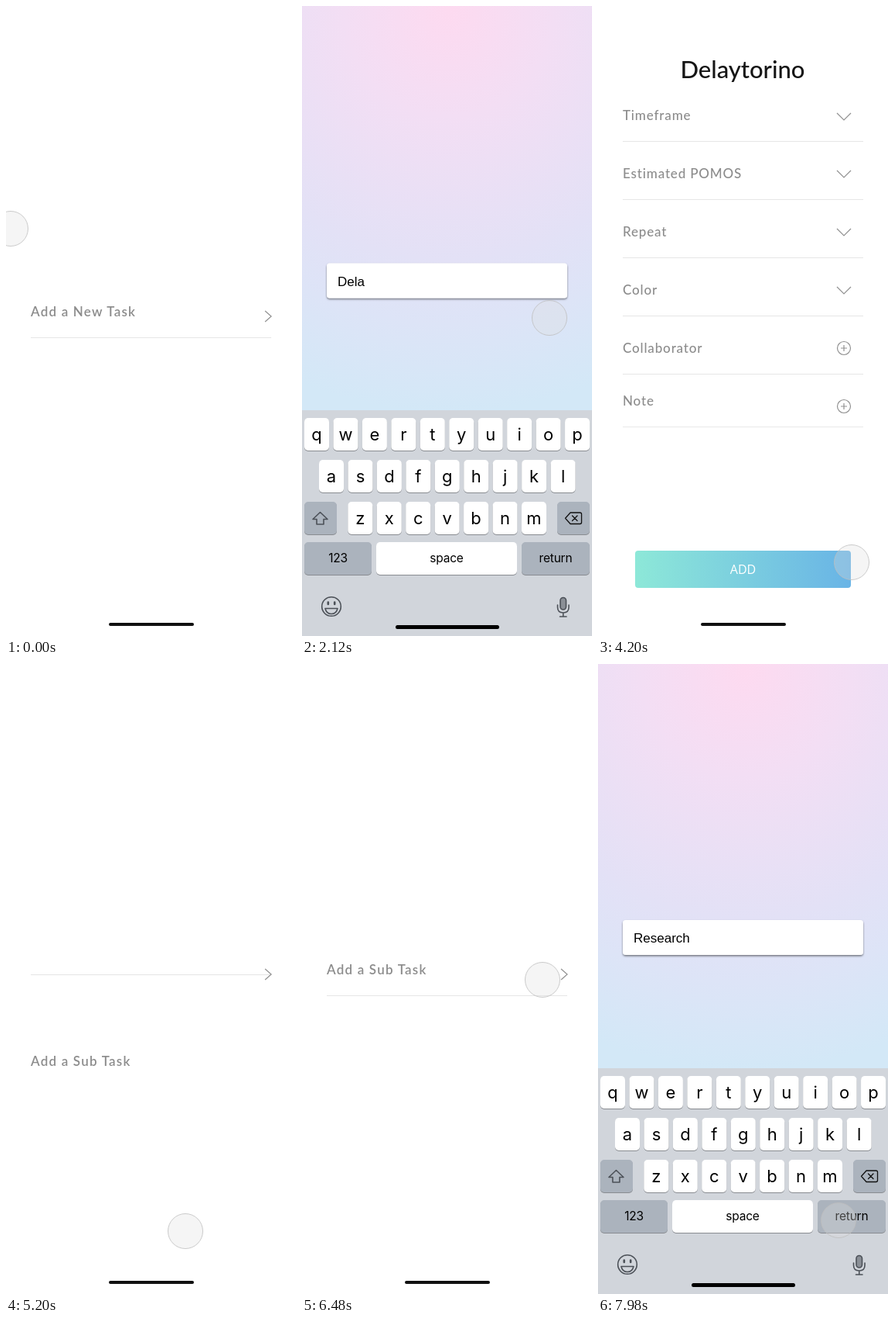
Recreate the animation shown at these times as an HTML page. Size 375x812 px, loop 8000 ms.

```html
<!DOCTYPE html>
<html lang="en">
<head>
<meta charset="utf-8">
<title>Task app</title>
<style>
html, body { margin: 0; width: 100%; height: 100%; overflow: hidden; background: #fff; }
svg { display: block; width: 100%; height: 100%; }
svg * { animation-duration: 8s; animation-iteration-count: infinite; }

.lato { font-family: Lato, sans-serif; font-weight: 500; font-size: 17px; fill: #8c8c8c; }
.row { letter-spacing: .85px; }
.add { letter-spacing: 1.2px; font-weight: 600; }
.title { font: 500 31px Lato, sans-serif; fill: #151515; text-anchor: middle; }
.button { font: 400 16px "Open Sans", sans-serif; fill: #fff; text-anchor: middle; }
.typed { font: 17px "Liberation Sans", Arial, sans-serif; fill: #000; }
.key { font-family: Inter, sans-serif; font-size: 22px; fill: #000; text-anchor: middle; }
.label { font-size: 15.5px; letter-spacing: -.2px; }
.rule { stroke: #e6e6e6; }
.thin { fill: none; stroke: #919191; stroke-width: 1.2; }
.glyph { fill: none; stroke: #4c5158; stroke-width: 1.6; stroke-linejoin: round; stroke-linecap: round; }

/* screens switch with hard cuts */
.list, .first, .second, .board, .word1, .word2, .form { animation-timing-function: step-end; }
.list { animation-name: list; }
.first { animation-name: first; }
.second, .form, .word1, .word2, .board { visibility: hidden; }
.second { animation-name: second; }
.board { animation-name: board; }
.word1 { animation-name: word1; }
.word2 { animation-name: word2; }
.form { animation-name: form; }
@keyframes list { 0%, 64.95% { visibility: visible } 23.2%, 83.7% { visibility: hidden } }
@keyframes first { 0% { visibility: visible } 23.2%, 100% { visibility: hidden } }
@keyframes second { 0%, 83.7%, 100% { visibility: hidden } 64.95% { visibility: visible } }
@keyframes board { 0%, 49.2% { visibility: hidden } 23.2%, 83.7%, 100% { visibility: visible } }
@keyframes word1 { 0%, 49.2%, 100% { visibility: hidden } 23.2% { visibility: visible } }
@keyframes word2 { 0% { visibility: hidden } 83.7%, 100% { visibility: visible } }
@keyframes form { 0%, 64.95%, 100% { visibility: hidden } 49.2% { visibility: visible } }

tspan { animation-name: type; animation-timing-function: step-end; }
@keyframes type { 0% { fill: #000 } 50%, 100% { fill: transparent } }

/* layers that glide after a cut */
.field { animation-name: field; }
.note { animation-name: note; }
.second { --from: 122px; }
.slide { animation-name: slide; }
.line { animation-name: line; }
@keyframes field {
  0%, 23.06%, 83.56% { transform: translateY(28px); animation-timing-function: ease }
  27.94%, 83.5%, 88.44%, 100% { transform: none }
}
@keyframes note {
  0%, 49.06% { transform: translateY(-122px); animation-timing-function: ease }
  53.94%, 100% { transform: none }
}
@keyframes slide {
  0%, 64.75% { transform: translateY(122px); animation-timing-function: ease }
  69.63%, 100% { transform: none }
}
@keyframes line {
  0%, 64.7%, 69.63%, 100% { transform: none }
  64.75% { transform: translateY(-28px); animation-timing-function: ease }
}

/* touch point: separate curves for x and y give the arcs */
.tx { animation-name: tx; animation-timing-function: linear; }
.ty { animation-name: ty; animation-timing-function: linear; }
@keyframes tx {
  0%, 14.88% { transform: translateX(6px) }
  15.81% { transform: translateX(402px) }
  17.56% { transform: translateX(402px); animation-timing-function: ease-out }
  20.5% { transform: translateX(320px) }
  31.5% { transform: translateX(320px); animation-timing-function: ease-in-out }
  40% { transform: translateX(352px) }
  43.9% { transform: translateX(350px); animation-timing-function: ease-out }
  46.5% { transform: translateX(328px) }
  55.6% { transform: translateX(328px); animation-timing-function: ease-in-out }
  62% { transform: translateX(232px) }
  65.75% { transform: translateX(232px); animation-timing-function: ease-in-out }
  75.3% { transform: translateX(193px); animation-timing-function: ease-in-out }
  81% { transform: translateX(311px) }
  91.6% { transform: translateX(311px); animation-timing-function: ease-in-out }
  94.5% { transform: translateX(297px); animation-timing-function: ease-in-out }
  99.75%, 100% { transform: translateX(311px) }
}
@keyframes ty {
  0%, 14.88% { transform: translateY(287px) }
  15.81% { transform: translateY(405px) }
  17.56% { transform: translateY(408px); animation-timing-function: ease-out }
  20.5% { transform: translateY(402px) }
  31.5% { transform: translateY(402px); animation-timing-function: cubic-bezier(.5,0,.5,.9) }
  40% { transform: translateY(673px) }
  43.9% { transform: translateY(698px); animation-timing-function: ease-out }
  46.5% { transform: translateY(717px) }
  55.6% { transform: translateY(717px); animation-timing-function: ease-in-out }
  57.7% { transform: translateY(683px); animation-timing-function: ease-in-out }
  62% { transform: translateY(731px) }
  65.75% { transform: translateY(731px); animation-timing-function: cubic-bezier(.45,0,.4,1) }
  77.5% { transform: translateY(375px); animation-timing-function: ease-in-out }
  81% { transform: translateY(407px) }
  91.6% { transform: translateY(407px); animation-timing-function: cubic-bezier(.4,0,.3,1) }
  99.75%, 100% { transform: translateY(717px) }
}
</style>
</head>
<body>
<svg viewBox="0 0 375 812">
  <defs>
    <radialGradient id="sky" gradientUnits="userSpaceOnUse" cx="190" cy="8" r="515">
      <stop offset="0" stop-color="#fddaf0"/>
      <stop offset=".26" stop-color="#f3def4"/>
      <stop offset=".62" stop-color="#e3e1f6"/>
      <stop offset=".78" stop-color="#dde4f7"/>
      <stop offset="1" stop-color="#d3e8f7"/>
    </radialGradient>
    <linearGradient id="mint">
      <stop offset="0" stop-color="#8de8d8"/>
      <stop offset="1" stop-color="#69b4e6"/>
    </linearGradient>
    <filter id="drop" x="-5%" y="-20%" width="110%" height="150%">
      <feDropShadow dx="0" dy="1.5" stdDeviation="1.3" flood-opacity=".5"/>
    </filter>
  </defs>

  <rect x="133" y="795" width="110" height="4" rx="2" fill="#111"/>

  <g class="list">
    <path class="rule line" d="M32 427.5H343"/>
    <path class="thin" d="M335 393l8 7-8 7"/>
  </g>
  <text class="lato add first" x="32" y="400">Add a New Task</text>
  <g class="slide"><text class="lato add second" x="32" y="400">Add a Sub Task</text></g>

  <g class="form">
    <text class="title" x="187" y="93">Delaytorino</text>
    <g id="rows"></g>
    <rect x="48" y="702" width="279" height="48" rx="4" fill="url(#mint)"/>
    <text class="button" x="187.5" y="732">ADD</text>
  </g>

  <g class="board">
    <rect width="375" height="522" fill="url(#sky)"/>
    <rect y="521" width="375" height="291" fill="#d1d5db"/>
    <g id="keys"></g>
    <path class="glyph" stroke-width="1.4" d="M23.5 652.5l9.5 9h-5v6.500h-9v-6.500h-5z"/>
    <path class="glyph" d="M347 653h12.500q2 0 2 2v10.500q0 2-2 2H347l-6.500-7.250zM349.500 657l6.500 6.500m0-6.500l-6.500 6.500" style="stroke:#111;stroke-width:1.300"/>
    <g class="glyph">
      <circle cx="38" cy="774" r="12.300"/>
      <path d="M30 776.500h16q-1.500 7-8 7t-8-7z"/>
      <path d="M33.800 768.500v2.500M42.200 768.500v2.500" stroke-width="2.600"/>
      <rect x="334" y="762.500" width="7.500" height="15.500" rx="3.750" fill="#8a8f96"/>
      <path d="M330.500 772v3q0 7 7.250 7t7.250-7v-3M337.750 782v5M333.500 787h8.500"/>
    </g>
    <rect x="121" y="798" width="134" height="5" rx="2.500"/>
    <g class="field">
      <rect x="32" y="330" width="311" height="45" rx="4" fill="#fff" filter="url(#drop)"/>
      <text class="typed word1" x="46" y="359" data-word="Delaytorino" data-start="1860"></text>
      <text class="typed word2" x="46" y="359" data-word="Research" data-start="6700"></text>
    </g>
  </g>

  <g class="tx"><g class="ty">
    <circle r="22.500" fill="#dcdcdc" fill-opacity=".3" stroke="#bebebe" stroke-opacity=".8"/>
  </g></g>
</svg>
<script>
const put = (id, html) => document.getElementById(id).innerHTML = html;

// form rows
const names = ['Timeframe', 'Estimated POMOS', 'Repeat', 'Color', 'Collaborator', 'Note'];
put('rows', names.map((name, i) => {
  const y = 141 + 75 * i;
  const icon = i < 4
    ? `<path class="thin" d="M309 ${y - (i ? 4 : 3)}l9 9 9-9"/>`
    : `<g class="thin"><circle cx="318" cy="${y}" r="8.500"/><path d="M314 ${y}h8m-4-4v8"/></g>`;
  return `${icon}<g class="${i === 5 ? 'note' : ''}">
    <text class="lato row" x="32" y="${y + 6}">${name}</text>
    <path class="rule" d="M32 ${y + 33.5}H343"/></g>`;
}).join(''));

// keyboard
const key = (x, y, w, text, fill = '#fff', label = '') =>
  `<rect x="${x}" y="${y + 1}" width="${w}" height="42" rx="5" fill="#898c91"/>
   <rect x="${x}" y="${y}" width="${w}" height="42" rx="5" fill="${fill}"/>
   <text class="key ${label}" x="${x + w / 2}" y="${y + (label ? 26 : 28.5)}">${text}</text>`;
const line = (chars, x, y) => [...chars].map((c, i) => key(x + 37.45 * i, y, 32, c)).join('');
const gray = '#abb3bd';
put('keys',
  line('qwertyuiop', 3, 531) + line('asdfghjkl', 22, 585) + line('zxcvbnm', 59.3, 639) +
  key(3, 639, 42, '', gray) + key(330, 639, 42, '', gray) +
  key(3, 691, 87, '123', gray, 'label') + key(96, 691, 182, 'space', '#fff', 'label') +
  key(284, 691, 88, 'return', gray, 'label'));

// typing: when each letter lands after the field opens
const beats = [40, 100, 180, 240, 380, 520, 640, 760, 880, 1000, 1120];
for (const el of document.querySelectorAll('[data-word]')) {
  const { word, start } = el.dataset;
  el.innerHTML = [...word].map((c, i) =>
    `<tspan style="animation-delay:${+start + beats[i] - 8000}ms">${c}</tspan>`).join('');
}
</script>
</body>
</html>
```
